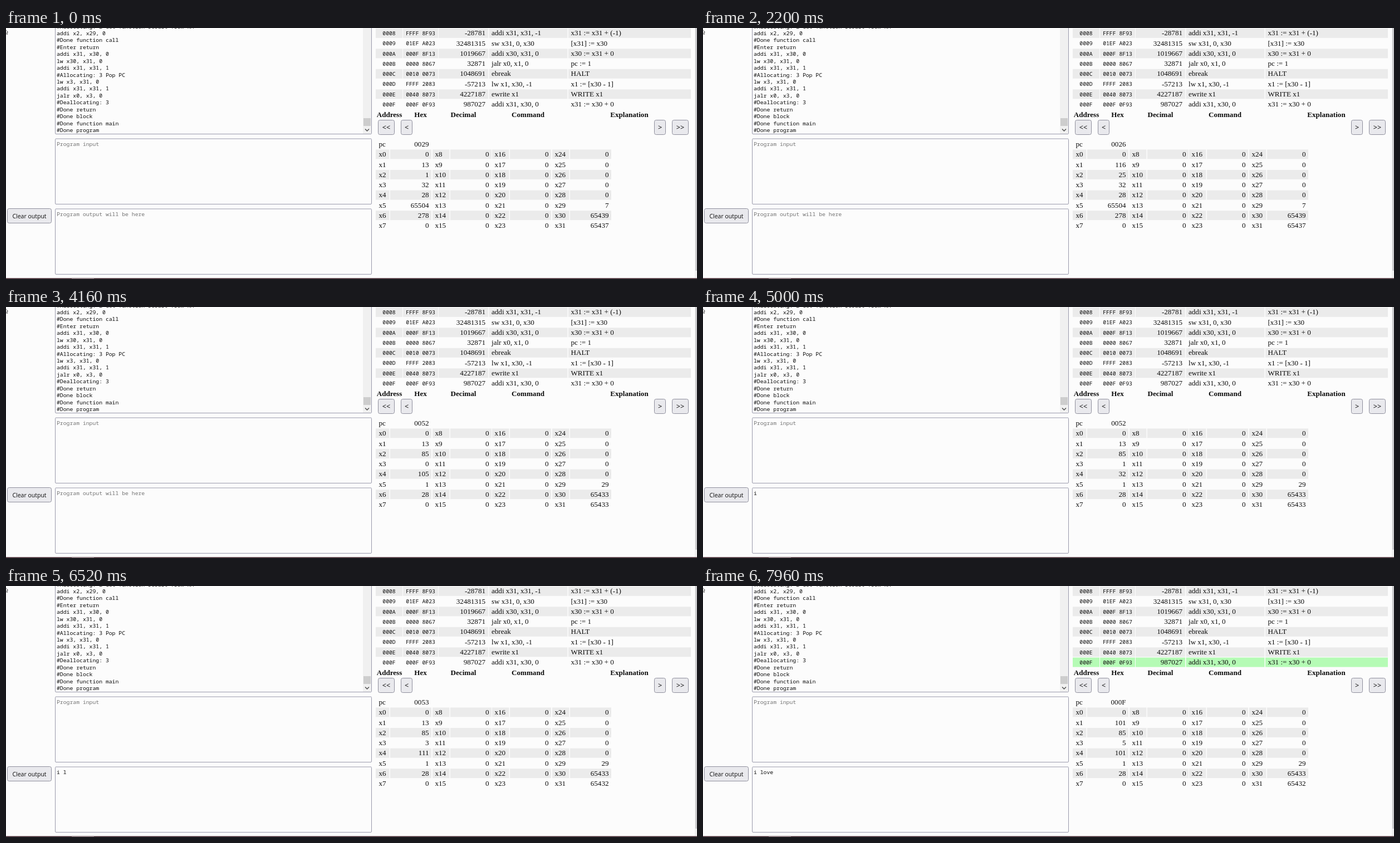
Recreate the animation shown at these times as an HTML page. Size 1241 px wide and 451 px high, loop 8 s.

```html
<!DOCTYPE html>
<html lang="en">
<head>
<meta charset="utf-8">
<style>
html, body { margin: 0; width: 100%; height: 100%; overflow: hidden; background: #fcfcfc; }
svg { display: block; }
text { font: 13.1px "Liberation Serif", serif; fill: #0c0c0c; white-space: pre; }
.mono { font: 9.78px "Noto Sans Mono", monospace; }
.hint { fill: #757575; }
.head { font-weight: bold; }
.ui { font: 10.5px "Open Sans", sans-serif; }
.nav { font: 12.6px "Open Sans", sans-serif; }
.box { fill: #fcfcfc; stroke: #9a9aac; }
.button { fill: #e9e9ed; stroke: #8f8f9d; }
.stripe { fill: #ebebeb; }
</style>
</head>
<body>
<svg id="stage" width="1241" height="451" viewBox="0 0 1241 451"></svg>
<script>
const stage = document.getElementById('stage');

function add(tag, attrs, content = '') {
  const node = document.createElementNS('http://www.w3.org/2000/svg', tag);
  for (const key in attrs) node.setAttribute(key, attrs[key]);
  node.textContent = content;
  stage.append(node);
  return node;
}
const text = (x, y, content, cls = '', anchor = 'start') =>
  add('text', { x, y, class: cls, 'text-anchor': anchor }, content);
const rect = (x, y, width, height, cls, fill = '') =>
  add('rect', fill ? { x, y, width, height, fill } : { x, y, width, height, class: cls });
const hex = n => n.toString(16).toUpperCase().padStart(4, '0');

function button(x, y, w, h, label, cls) {
  rect(x + .5, y + .5, w - 1, h - 1, 'button').setAttribute('rx', 3);
  text(x + w / 2, y + h / 2 + 4, label, cls, 'middle');
}

// Program listing, input and output boxes
const listing = `#Allocating: 2 Get function result from RA
addi x2, x29, 0
#Done function call
#Enter return
addi x31, x30, 0
lw x30, x31, 0
addi x31, x31, 1
#Allocating: 3 Pop PC
lw x3, x31, 0
addi x31, x31, 1
jalr x0, x3, 0
#Deallocating: 3
#Done return
#Done block
#Done function main
#Done program`;
for (const [y, h] of [[-20, 210], [198.5, 117.5], [324.5, 117.5]])
  rect(88.5, y + .5, 568, h, 'box').setAttribute('rx', 1.5);
listing.split('\n').forEach((line, i) => text(91, .6 + i * 12.43, line, 'mono'));
rect(641, 0, 15, 190, '', '#f0f0f0');
rect(642, 162, 13, 14, '', '#cdcdcd');
add('path', { d: 'M645 181.5l3.5 3.5 3.5-3.5', fill: 'none', stroke: '#505050', 'stroke-width': 1.5 });
text(91, 212, 'Program input', 'mono hint');
const output = text(91, 337.5, '', 'mono');
button(2, 324, 80, 27, 'Clear output', 'ui');

// Memory table
const memory = [
  ['FFFF 8F93', -28781, 'addi x31, x31, -1', 'x31 := x31 + (-1)'],
  ['01EF A023', 32481315, 'sw x31, 0, x30', '[x31] := x30'],
  ['000F 8F13', 1019667, 'addi x30, x31, 0', 'x30 := x31 + 0'],
  ['0000 8067', 32871, 'jalr x0, x1, 0', 'pc := 1'],
  ['0010 0073', 1048691, 'ebreak', 'HALT'],
  ['FFFF 2083', -57213, 'lw x1, x30, -1', 'x1 := [x30 - 1]'],
  ['0040 8073', 4227187, 'ewrite x1', 'WRITE x1'],
  ['000F 0F93', 987027, 'addi x31, x30, 0', 'x31 := x30 + 0']
];
const columns = [[664, 48], [713, 63], [777, 89], [867.5, 141], [1010, 220]];
const rowCells = memory.map(([code, decimal, command, meaning], i) => {
  const y = .8 + i * 18.25;
  const cells = columns.map(([x, w]) => rect(x, y, w, 17, '', '#fcfcfc'));
  text(688, y + 12.2, hex(8 + i), 'mono', 'middle');
  text(744.5, y + 12.2, code, 'mono', 'middle');
  text(861, y + 12.6, decimal, '', 'end');
  text(872, y + 12.6, command);
  text(1014.5, y + 12.6, meaning);
  return cells;
});
[['Address', 688.5], ['Hex', 744.5], ['Decimal', 821.5], ['Command', 937.5], ['Explanation', 1119.5]]
  .forEach(([label, x]) => text(x, 160, label, 'head', 'middle'));
button(668, 165, 30, 27, '<<', 'nav');
button(709, 165, 21, 27, '<', 'nav');
button(1164, 165, 21, 27, '>', 'nav');
button(1196, 165, 30, 27, '>>', 'nav');

// Register table
text(669.5, 213, 'pc');
const pcText = text(759.5, 213, '', '', 'end');
const registers = [];
for (let i = 0; i < 32; i++) {
  const col = i >> 3, row = i & 7, x = 664 + col * 108 - (col > 1 ? 1 : 0);
  const y = 218.4 + row * 18.3, left = col ? x - 6 : x;
  if (row % 2 === 0) {
    rect(left, y, x + 24.5 - left, 17, 'stripe');
    rect(x + 26, y, 74, 17, 'stripe');
  }
  text(col ? x - 1.5 : 669.5, y + 12.8, 'x' + i);
  registers.push(text(x + 95.5, y + 12.8, '', '', 'end'));
}

// Window edges and pointer
rect(1237, 0, 4, 449, '', '#f0f0f0');
rect(1238, 0, 3, 436, '', '#c9c9cb');
rect(0, 449.5, 1241, 1.5, '', '#40242c');
rect(118, 449.5, 40, 1.5, '', '#8c7a80');
add('path', { d: 'M0 3.5L3.5 7.5H1.6L2.8 11 1.4 11.5 0 9', fill: '#fff', stroke: '#333', 'stroke-width': .8 });

const message = 'i love';
const range = (from, to) => Array.from({ length: to - from + 1 }, (_, i) => from + i);
const returnPath = [...range(0x2A, 0x2F), ...range(0x116, 0x11E)];
const enterPath = [...range(0x11E, 0x120), ...range(0x39, 0x52)];
const writePath = [...range(0x4E, 0x54), ...range(0x0D, 0x14), 0x55, 0x56];

// Instruction count between two ticks
const steps = (tick, t0, t1, n0, n1) => Math.floor(n0 + (tick - t0) * (n1 - n0) / (t1 - t0) + 1e-6);

function copyState(tick) {
  const n = tick < 29 ? steps(tick, 0, 29, 83, 120) : steps(tick, 29, 67, 120, 168);
  const i = Math.floor(n / 6), phase = n % 6;
  const x1 = phase === 0 ? 65504 + i : phase < 3 ? 97 + i * 7 % 26 : i;
  return { pc: 0x24 + phase, 1: x1, 2: phase < 4 ? i : 1, 3: 32, 4: 28, 5: 65504, 6: 278,
    29: 7, 30: 65439, 31: 65437 };
}

function returnState(tick) {
  const n = steps(tick, 67, 76, 0, 14);
  const stack = n < 6 ? 65439 + (n > 2) + (n > 4) : 65441 + Math.min(4, n - 6);
  return { pc: returnPath[n], 1: n < 4 ? 28 : 278, 2: n < 12 ? 1 : 57, 3: n < 9 ? 32 : 65504,
    4: 28, 5: 65504, 6: 278, 29: 29, 30: n < 2 ? 65439 : 65534, 31: stack };
}

function enterState(tick) {
  const n = tick - 76;
  return { pc: enterPath[n], 1: n < 27 ? 278 : 13, 2: n < 26 ? 57 : 85, 3: n < 12 ? 65504 : 0,
    4: n < 24 ? 28 : 105, 5: n < 20 ? 65504 : 1, 6: n < 9 ? 278 : 28, 29: 29,
    30: n < 4 ? 65534 : n < 28 ? 65440 : 65433, 31: 65445 - Math.floor(n * 12 / 28) };
}

function writeState(tick) {
  const n = tick < 146 ? steps(tick, 104, 146, 4, 39)
    : tick < 180 ? steps(tick, 146, 180, 39, 74) : steps(tick, 180, 199, 74, 94);
  const i = Math.floor(n / 17), phase = n % 17, char = message.charCodeAt(i);
  const inCall = phase > 3 && phase < 12;
  const stack = phase < 2 ? 65435 : phase < 4 ? 65434 : phase === 4 ? 65433
    : phase < 10 ? 65432 : phase < 12 ? 65433 : phase < 14 ? 65434 : 65435;
  return { pc: writePath[phase], 1: phase < 3 ? 85 : phase < 8 ? 13 : phase < 14 ? char : 85,
    2: 85, 3: i + (phase > 15), 4: phase < 1 && i ? message.charCodeAt(i - 1) : char,
    5: 1, 6: 28, 29: 29, 30: inCall ? 65433 : 65440, 31: stack, out: message.slice(0, i + (phase > 8)) };
}

function draw(now) {
  const tick = Math.floor(now % 8000 / 40);
  const state = (tick < 67 ? copyState : tick < 76 ? returnState : tick < 104 ? enterState : writeState)(tick);
  pcText.textContent = hex(state.pc);
  registers.forEach((node, i) => node.textContent = state[i] || 0);
  output.textContent = state.out || 'Program output will be here';
  output.setAttribute('class', state.out ? 'mono' : 'mono hint');
  rowCells.forEach((cells, i) => {
    const fill = state.pc === 8 + i ? '#b5fbb5' : i % 2 ? '#fcfcfc' : '#ebebeb';
    cells.forEach(cell => cell.setAttribute('fill', fill));
  });
}

const start = performance.now();
function loop() {
  draw(performance.now() - start);
  requestAnimationFrame(loop);
}
loop();
</script>
</body>
</html>
```
